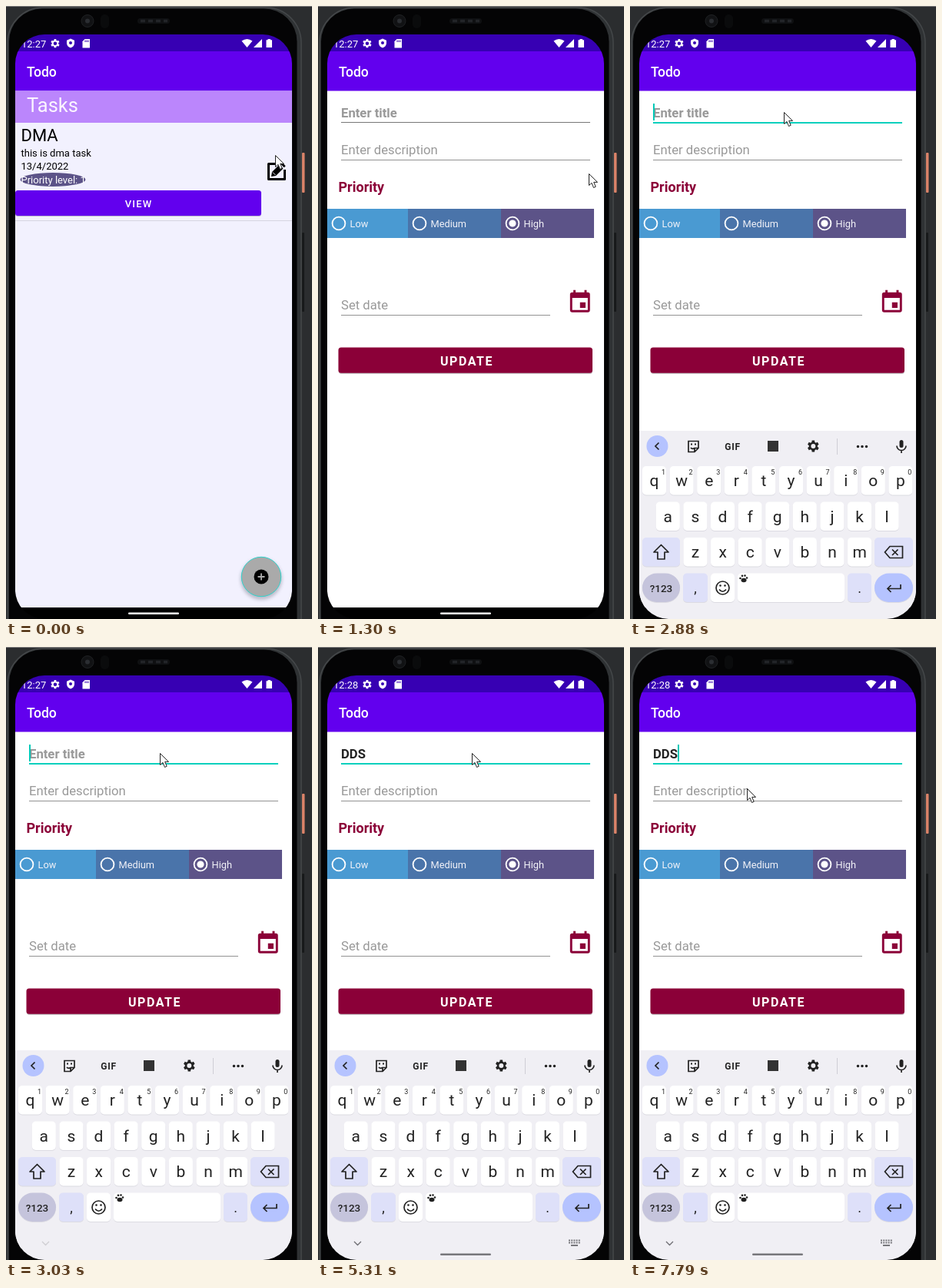
Animation, 398 px wide and 798 px high, one loop 8 s. Source, as an HTML page:

```html
<!DOCTYPE html>
<html lang="en">
<head>
<meta charset="utf-8">
<title>Todo app</title>
<style>
html, body { margin: 0; width: 100%; height: 100%; overflow: hidden; background: #2b2d2f; }
svg { display: block; width: 398px; height: 798px; font-family: Roboto, sans-serif; }
.mid { text-anchor: middle; }
.hint { font-size: 16.7px; fill: #999; }
.bold { font-weight: 700; }
.line { fill: none; stroke: #222; stroke-width: 1.7; }
</style>
</head>
<body>
<svg viewBox="0 0 398 798">
  <defs>
    <clipPath id="screen"><rect x="12" y="37" width="360" height="761" rx="38"/></clipPath>
    <filter id="soft" x="-30%" y="-30%" width="160%" height="160%"><feGaussianBlur stdDeviation="2"/></filter>
    <path id="gear" d="M19.4 13a7.5 7.5 0 0 0 0-2l2.1-1.6-2-3.5-2.5 1a7 7 0 0 0-1.7-1L15 3.300h-4l-.4 2.600a7 7 0 0 0-1.700 1l-2.500-1-2 3.500L6.500 11a7.500 7.500 0 0 0 0 2l-2.100 1.600 2 3.500 2.500-1a7 7 0 0 0 1.700 1l.4 2.600h4l.4-2.600a7 7 0 0 0 1.700-1l2.500 1 2-3.500zM13 15.500a3.500 3.500 0 1 1 0-7 3.500 3.500 0 0 1 0 7z" fill-rule="evenodd"/>
  </defs>

  <!-- phone body -->
  <rect width="398" height="798" fill="#2b2d2f"/>
  <path d="M0 .5H398" stroke="#777"/>
  <rect x="2" y="2" width="382" height="860" rx="46" fill="#2f3234" stroke="#45484a" stroke-width="1.500"/>
  <rect x="4" y="3.500" width="374.500" height="860" rx="43" fill="#040405"/>
  <rect x="385" y="191" width="3.500" height="52" rx="1" fill="#d98268"/>
  <rect x="385" y="295" width="3" height="103" rx="1" fill="#17191a"/>
  <circle cx="106" cy="19.500" r="8" fill="#111214" stroke="#202224"/>
  <circle cx="106" cy="19.500" r="3" fill="#2b2e32"/>
  <rect x="123" y="11" width="11" height="18" rx="5" fill="#0a0b0c"/>
  <rect x="171" y="16" width="42" height="7" rx="3.500" fill="#0f1012"/>
  <path d="M175 19.500H210" stroke="#222428" stroke-width="3.500" stroke-dasharray="6 4"/>

  <g clip-path="url(#screen)">
    <rect x="12" y="37" width="360" height="22" fill="#3700b3"/>
    <rect x="12" y="59" width="360" height="52" fill="#6200ee"/>
    <g fill="#fff">
      <text id="clock" x="20" y="53.500" font-size="13"></text>
      <use href="#gear" transform="translate(55.500 40.900) scale(.65)"/>
      <path d="M84 42.500l5 2.200v3.500c0 3-2 5.300-5 6.300-3-1-5-3.300-5-6.300v-3.500z"/>
      <path d="M102.500 43h6.500v11.500h-9.500v-8.300z"/>
      <path d="M306.500 45.500Q313.500 40.500 320.500 45.500L313.500 54z"/>
      <path d="M333 43V54H322z"/>
      <path d="M338.500 44.200h2V43h3.500v1.200h2V54h-7.500z"/>
      <text x="27" y="92" font-size="17.600" font-weight="500">Todo</text>
    </g>
    <circle cx="84" cy="48" r="2" fill="#3700b3"/>
    <path d="M103 44.500v2.500M105 44.500v2.500M107 44.500v2.500" stroke="#3700b3"/>

    <g id="tasks">
      <rect x="12" y="110.500" width="360" height="672.500" fill="#f2f1fe"/>
      <rect x="12" y="110.500" width="360" height="41.500" fill="#bb86fc"/>
      <text x="27" y="138" font-size="25.500" fill="#fbf5ff">Tasks</text>
      <text x="19.500" y="175.500" font-size="22">DMA</text>
      <text x="19.500" y="195.500" font-size="13">this is dma task</text>
      <text x="19.500" y="213" font-size="13">13/4/2022</text>
      <ellipse cx="61" cy="226" rx="42.500" ry="9" fill="#5c5388"/>
      <text x="19.500" y="230.500" font-size="13" fill="#fff">Priority level: 1</text>
      <rect x="12" y="241" width="320" height="33" rx="3.500" fill="#b9b4cf"/>
      <rect x="12" y="240" width="320" height="33" rx="3.500" fill="#6200ee"/>
      <text class="mid" x="172.500" y="261.500" font-size="13" font-weight="500" letter-spacing="1.200" fill="#fff">VIEW</text>
      <path d="M12 279.500H372" stroke="#d6d5e0"/>
      <path d="M355 205.500H341.500V225.500H362.500V213" fill="none" stroke="#000" stroke-width="3" stroke-linejoin="round"/>
      <path d="M345 222l1-6 9.500-9.500 5 5-9.500 9.500zM356.700 205.300l2-2 5 5-2 2z"/>
      <path d="M347 216.500l3.500 3.500" stroke="#f2f1fe"/>
      <circle cx="332" cy="746" r="27" fill="#889" opacity=".5" filter="url(#soft)"/>
      <circle cx="332" cy="743" r="25.700" fill="#aaa" stroke="#2fd3cb"/>
      <circle cx="332" cy="743" r="9.500"/>
      <path d="M327.500 743h9M332 738.500v9" stroke="#aaa" stroke-width="1.800"/>
    </g>

    <g id="edit">
      <rect x="12" y="110.500" width="360" height="672.500" fill="#fff"/>
      <text id="title" class="hint bold" x="30" y="144.500"></text>
      <path id="rule" d="M30 151.500H354"/>
      <rect id="caret" y="127" width="2" height="22" fill="#03c9b7"/>
      <text class="hint" x="30" y="193">Enter description</text>
      <path d="M30 200.500H354M30 402.500H302" stroke="#929292"/>
      <text class="bold" x="26.500" y="242" font-size="18" fill="#8b0038">Priority</text>
      <g id="radios"></g>
      <circle cx="253" cy="283" r="4.600" fill="#fff"/>
      <text class="hint" x="30" y="395">Set date</text>
      <path transform="translate(323.500 368.400) scale(1.44)" fill="#8b0038" d="M17 12h-5v5h5zM16 1v2H8V1H6v2H5a2 2 0 0 0-2 2v14a2 2 0 0 0 2 2h14a2 2 0 0 0 2-2V5a2 2 0 0 0-2-2h-1V1zM19 19H5V8h14z"/>
      <rect x="27" y="445.500" width="330" height="33.500" rx="3.500" fill="#c8c8c8"/>
      <rect x="26.500" y="444.500" width="330.500" height="33.300" rx="3.500" fill="#8b0038"/>
      <text class="mid bold" x="193.500" y="467.500" font-size="16" letter-spacing="1.500" fill="#fff">UPDATE</text>
    </g>
    <rect x="12" y="783" width="360" height="15"/>
    <rect x="159" y="789.500" width="66" height="2.500" rx="1.200" fill="#fff"/>

    <g id="board">
      <rect x="12" y="525" width="360" height="274" fill="#f0eff4"/>
      <circle cx="35.500" cy="545" r="14" fill="#b5c3ff"/>
      <path class="line" d="M37.500 540.500l-4.500 4.500 4.500 4.500"/>
      <path class="line" d="M76 538.500h13v9l-5 5h-8zM89 547.500h-5v5M79 547q2 2.500 5 .5" stroke-width="1.600"/>
      <path d="M79 541.500h2v2h-2zM84 541.500h2v2h-2z" fill="#222"/>
      <text class="mid bold" x="133.500" y="549.500" font-size="12" letter-spacing=".7" fill="#222">GIF</text>
      <rect x="179" y="538" width="14" height="14" fill="#333"/>
      <use href="#gear" fill="#222" transform="translate(227.300 534.800) scale(.85)"/>
      <path d="M269.500 535V556" stroke="#cfced6"/>
      <path d="M296.500 545.500h0M302 545.500h0M307.500 545.500h0" stroke="#222" stroke-width="3.600" stroke-linecap="round"/>
      <rect x="350.500" y="537" width="5" height="10" rx="2.500" fill="#222"/>
      <path class="line" d="M347 544.500a6 6 0 0 0 12 0M353 550.500v3.500"/>
      <g id="keys"></g>
      <path class="line" d="M40.500 673.500l9.500 9.500h-5v9h-9v-9h-5z" stroke-linejoin="round"/>
      <path class="line" d="M338 675.500h16.500v15H338l-6.500-7.500zM341 679.500l7.500 7.500M348.500 679.500l-7.500 7.500"/>
      <path class="line" d="M352 725v5.500H335M339.500 726l-4.500 4.500 4.500 4.500"/>
      <circle class="line" cx="120.500" cy="729.500" r="8.500"/>
      <path class="line" d="M116 731.500q4.500 5.500 9 0"/>
      <path d="M117.500 726.500h0M123.500 726.500h0M143.500 717h0M146 713.800h0M149.500 713.500h0M152 716.500h0" stroke="#222" stroke-width="2.700" stroke-linecap="round"/>
      <ellipse cx="148" cy="719.500" rx="3.500" ry="2.800" fill="#222"/>
      <path id="chevron" d="M47 774l4.500 4.500 4.500-4.500" fill="none" stroke="#6d6d72" stroke-width="1.300"/>
      <g id="tools">
        <path d="M326 772.500H341M326 775.500H341" stroke="#77777c" stroke-width="2" stroke-dasharray="2 1.200"/>
        <path d="M329 779H338" stroke="#77777c" stroke-width="2"/>
      </g>
      <rect id="pill" x="159" y="789.500" width="66" height="2.500" rx="1.200" fill="#77777b"/>
    </g>
  </g>
  <path id="mouse" d="M.5.5V15.500L4 12.400 6.500 18.500 9.200 17.300 6.700 11.400H11.500Z" fill="#fff" stroke="#222"/>
</svg>

<script>
const $ = id => document.getElementById(id);
const show = (id, on) => $(id).setAttribute('opacity', +on);

const label = (x, y, size, s, extra = 'class="mid"') =>
  `<text x="${x}" y="${y}" font-size="${size}" fill="#222" ${extra}>${s}</text>`;
const key = (x, y, w, fill = '#fff', r = 5) =>
  `<rect x="${x}" y="${y + 1}" width="${w}" height="37.500" rx="${r}" fill="#dcdbe2"/>` +
  `<rect x="${x}" y="${y}" width="${w}" height="37.500" rx="${r}" fill="${fill}"/>`;

// Keyboard
let keys = '';
[['qwertyuiop', 16, 571], ['asdfghjkl', 33.8, 617.5], ['zxcvbnm', 69.5, 664]].forEach(([row, left, y], r) =>
  [...row].forEach((c, i) => {
    const x = left + i * 35.6;
    keys += key(x, y, 31) + label(x + 15.5, y + 26, 21, c);
    if (!r) keys += label(x + 27.5, y + 11, 9, (i + 1) % 10);
  }));
const pale = '#dee0f9', blue = '#b5c3ff';
[[16, 664, 49, pale], [318, 664, 50, pale], [16, 710.5, 49, '#c5c4dc', 18.7], [69, 710.5, 32, pale],
 [105, 710.5, 31], [140, 710.5, 139], [283, 710.5, 31, pale], [318, 710.5, 50, blue, 18.7]]
  .forEach(k => keys += key(...k));
keys += label(40.5, 734.5, 13.5, '?123', 'class="mid" font-weight="500"') + label(85, 735.5, 18, ',') + label(298.5, 735.5, 18, '.');
$('keys').innerHTML = keys;

// Priority choices
$('radios').innerHTML = [['Low', 12, 105, '#4a9ad2'], ['Medium', 117, 121, '#4a74aa'], ['High', 238, 121, '#5c5388']]
  .map(([s, x, w, c]) => `<rect x="${x}" y="264" width="${w}" height="38" fill="${c}"/>
    <circle cx="${x + 15}" cy="283" r="8.400" fill="none" stroke="#fff" stroke-width="1.800"/>
    <text x="${x + 29.5}" y="288" font-size="12.800" fill="#f2f2f8">${s}</text>`).join('');

// Each track holds [time, value...] and keeps a value until the next time.
const at = (track, t) => track.filter(k => k[0] <= t).pop().slice(1);
const mouse = [[0, 350, 194], [500, 350, 199], [640, 351, 211], [770, 352, 218],
  [1840, 322, 198], [1970, 258, 164], [2110, 213, 143], [2240, 200, 138],
  [5450, 198, 144], [5590, 191, 158], [5740, 182, 171], [5880, 179, 176],
  [6600, 172, 180], [6730, 158, 184], [6870, 152, 184]];
const slide = [[0, 280], [2740, 165], [2880, 28], [3030, 0]];
const typed = [[0, ''], [3980, 'D'], [4500, 'DD'], [4910, 'DDS']];
const caret = [[0, 0], [2610, 1], [3330, 0], [3710, 1], [5310, 0], [5880, 1], [6320, 0], [6870, 1], [7240, 0], [7790, 1]];
const chevron = [[0, 0], [3030, .25], [3180, .7], [3330, 1]];

function draw(now) {
  const t = now % 8000, [text] = at(typed, t), focus = t >= 2610;
  show('tasks', t < 1300);
  show('edit', t >= 1300);
  $('clock').textContent = t < 3980 ? '12:27' : '12:28';
  $('title').textContent = text || 'Enter title';
  $('title').style.fill = text ? '#222' : '#999';
  $('rule').setAttribute('stroke', focus ? '#03d0bd' : '#777');
  $('rule').setAttribute('stroke-width', focus ? 2 : 1);
  $('rule').setAttribute('transform', `translate(0 ${focus ? .5 : 0})`);
  $('caret').setAttribute('x', [30, 41, 52, 62][text.length]);
  show('caret', at(caret, t)[0]);
  $('board').setAttribute('transform', `translate(0 ${at(slide, t)[0]})`);
  show('chevron', at(chevron, t)[0]);
  show('tools', t >= 3980);
  show('pill', t >= 3330);
  $('mouse').setAttribute('transform', `translate(${at(mouse, t)})`);
  requestAnimationFrame(() => draw(performance.now()));
}
draw(performance.now());
</script>
</body>
</html>
```
